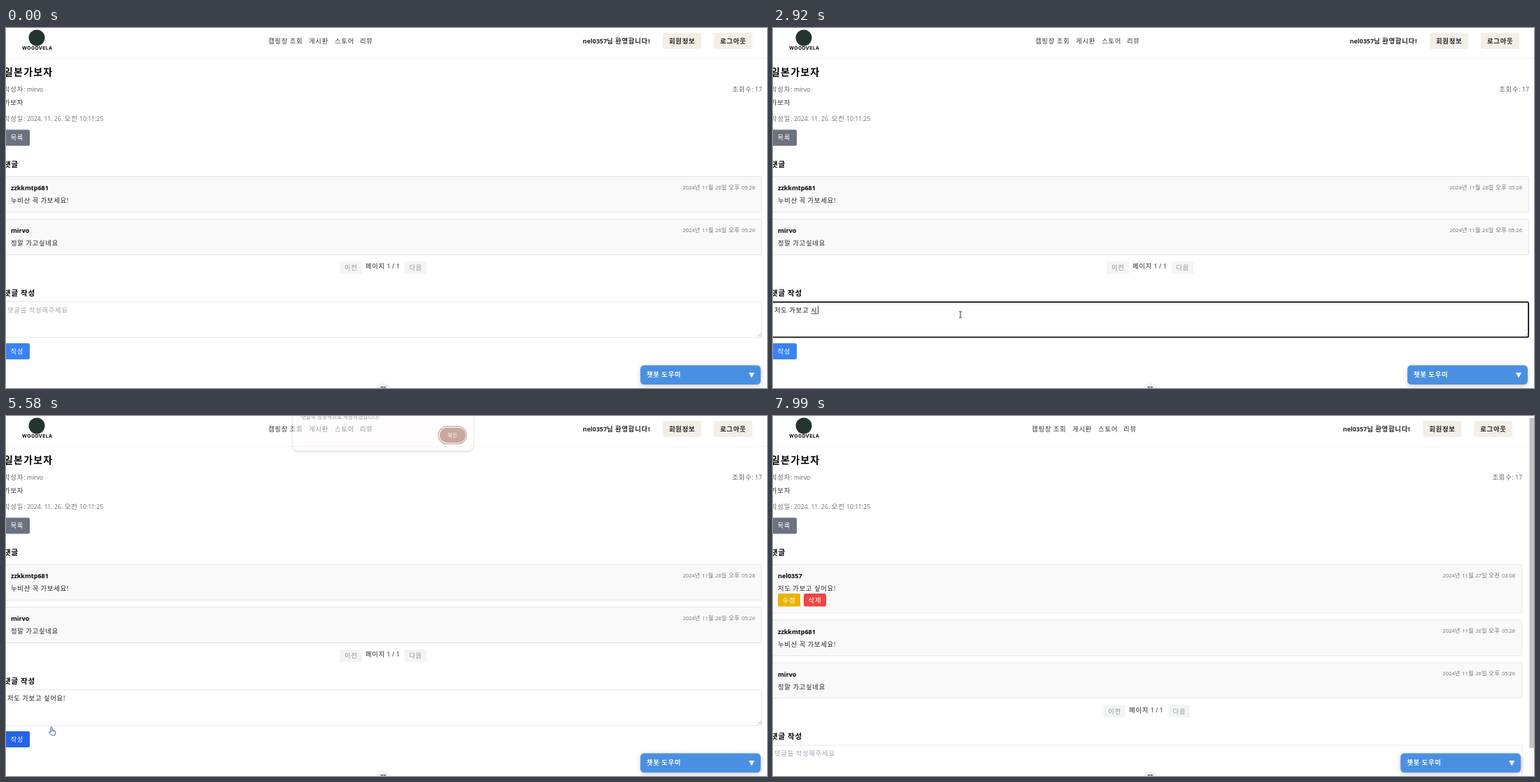
Animation of 1088 by 515 pixels, one loop 8790 ms. Source, as an HTML page:

```html
<!DOCTYPE html>
<html lang="ko">
<head>
<meta charset="utf-8">
<title>캠핑 게시판</title>
<style>
html, body { margin: 0; width: 100%; height: 100%; overflow: hidden; background: #fff; }
svg { display: block; width: 100vw; height: 100vh; }
text { font-family: "Open Sans", "Noto Sans CJK KR", sans-serif; word-spacing: .03em; white-space: pre; }
.brand { font-family: Inter, sans-serif; }
.chat { filter: drop-shadow(0 2px 3px rgba(0, 0, 0, .22)); }
.modal { filter: drop-shadow(0 1px 1.5px rgba(0, 0, 0, .4)); }
</style>
</head>
<body>
<svg id="stage" viewBox="0 0 1088 515"></svg>
<script>
const LOOP = 8790, FOCUS = 860, SUBMIT = 5380, DONE = 6640;
const USER = 'nel0357', MSG = '저도 가보고 싶어요!';
const SIZE = 9.2, SMALL = 8.05, LEFT = -3;
const stage = document.getElementById('stage');
const clamp = v => Math.max(0, Math.min(1, v));
const isHangul = c => /[ㄱ-힣]/.test(c);

// cy is the optical middle of the line; Hangul is set slightly larger and looser than Latin
function text(x, cy, str, { size = SIZE, fill = '#222', bold = false, anchor = 'start' } = {}) {
  const body = str.replace(/[ㄱ-힣]+/g,
    `<tspan font-size="${size * 1.015}" letter-spacing="${size * .086}">$&</tspan>`);
  return `<text x="${x}" y="${cy + size * .37}" font-size="${size * (bold ? .98 : .94)}" fill="${fill}"
    font-weight="${bold ? 700 : 400}" text-anchor="${anchor}">${body}</text>`;
}
const rect = (x, y, x2, y2, fill, r = 0, more = '') =>
  `<rect x="${x}" y="${y}" width="${x2 - x}" height="${y2 - y}" rx="${r}" fill="${fill}" ${more}/>`;
const path = (d, fill, stroke = 'none', more = '') =>
  `<path d="${d}" fill="${fill}" stroke="${stroke}" ${more}/>`;
const button = (x, y, x2, y2, fill, tx, label, opt) =>
  rect(x, y, x2, y2, fill, 2.3) + text(tx, (y + y2) / 2, label, { fill: '#fff', ...opt });

// Typing, syllable by syllable as an input method composes it
const typed = [
  [1660, 'ㅈ'], [1720, '저'], [1860, '젇'], [1920, '저도'],
  ...['저도 ', '저도 ㄱ', '저도 가', '저도 갑', '저도 가보', '저도 가복', '저도 가보고',
    '저도 가보고 ', '저도 가보고 ㅅ', '저도 가보고 시'].map((s, i) => [2120 + i * 88.8, s]),
  [3060, '저도 가보고 싶'], [3260, '저도 가보고 싶ㅇ'], [3320, '저도 가보고 싶어'],
  [3460, '저도 가보고 싶엉'], [3590, '저도 가보고 싶어요'], [3920, MSG]
];

function header(shift) {
  const nav = [[375, '캠핑장 조회'], [433, '게시판'], [470, '스토어'], [506, '리뷰']];
  const right = 2 * shift;
  return rect(0, 43, 1088, 44, '#f0f0f0')
    + '<circle cx="44" cy="14" r="11.5" fill="#26352b"/>'
    + '<text class="brand" x="44.8" y="31.3" font-size="6.7" font-weight="700" letter-spacing=".5" text-anchor="middle">WOODVELA</text>'
    + nav.map(([x, s]) => text(x - shift, 18.5, s, { fill: '#333' })).join('')
    + text(920.5 - right, 18.5, USER + '님 환영합니다!', { bold: true, anchor: 'end' })
    + [[939, '회원정보'], [1012, '로그아웃']].map(([x, s]) =>
      button(x - right, 7, x + 55 - right, 30, '#f3efe6', x + 9 - right, s, { fill: '#222', bold: true })).join('');
}

function card(y, y2, right, name, body, date) {
  return rect(LEFT, y + .5, right - .5, y2 - .5, '#f9f9f9', 2.3, 'stroke="#e5e5e5"')
    + text(7, y + 17, name, { bold: true, fill: '#000' })
    + text(7, y + 35, body)
    + text(right - 10, y + 16, date, { size: SMALL, fill: '#6b7280', anchor: 'end' });
}

function textarea(t, y, right, done) {
  const focus = t >= FOCUS && t < SUBMIT;
  const key = done ? null : typed.findLast(k => t >= k[0]);
  const value = key ? key[1] : '';
  let out = focus
    ? rect(LEFT, y + .9, right - .9, y + 51.2, '#fff', 1.8, 'stroke="#101010" stroke-width="1.8"')
    : rect(LEFT, y + .5, right - .5, y + 51.5, '#fff', 2, 'stroke="#e5e7eb"');
  out += path(`M${right - 6} ${y + 50}l5-5M${right - 3} ${y + 50}l2-2`, 'none', '#888', 'stroke-width=".7"');
  out += value ? text(2, y + 12.5, value, { fill: '#111' })
    : text(2, y + 12.5, '댓글을 작성해주세요', { fill: '#9ca3af' });
  if (focus) {
    const end = [...value].reduce((x, c) => x + (isHangul(c) ? SIZE * 1.02 : 2.5), 2.2);
    if (value && t < 3920 && isHangul(value.at(-1))) out += rect(end - 9, y + 17.2, end, y + 18, '#222');
    const since = t - (key ? key[0] : FOCUS);
    if (Math.floor(since / 530) % 2 === 0) out += rect(Math.round(end), y + 6.5, Math.round(end) + .8, y + 18, '#111');
  }
  return out;
}

function page(t) {
  const done = t >= DONE, shift = done ? 4.9 : 0, dy = done ? 79.3 : 0;
  const right = 1081 - 2 * shift, grey = { fill: '#6b7280' };
  const mid = x => x - shift;
  const pager = (x, x2, tx, s) =>
    button(mid(x), 334 + dy, mid(x2), 352 + dy, '#f3f4f6', mid(tx), s, { fill: '#8f949c' });
  let out = header(shift)
    + text(LEFT, 63, '일본가보자', { size: 13.8, bold: true, fill: '#000' })
    + text(LEFT, 88, '작성자: mirvo', { fill: '#5b616b' })
    + text(right, 88, '조회수: 17', { fill: '#5b616b', anchor: 'end' })
    + text(LEFT, 106.5, '가보자', { fill: '#333' })
    + text(LEFT, 129.5, '작성일: 2024. 11. 26. 오전 10:11:25', grey)
    + button(LEFT, 145.5, 34, 168.5, '#6b7280', 6.4, '목록')
    + text(LEFT, 195, '댓글', { size: 10.35, bold: true, fill: '#000' });
  if (done) out += card(212, 282.5, right, USER, MSG, '2024년 11월 27일 오전 03:08')
    + button(7, 254, 39, 272.5, '#eab308', 13.8, '수정')
    + button(44, 254, 76, 272.5, '#ef4444', 50.6, '삭제');
  out += card(212 + dy, 264 + dy, right, 'zzkkmtp681', '누비산 꼭 가보세요!', '2024년 11월 26일 오후 05:28')
    + card(273 + dy, 325 + dy, right, 'mirvo', '정말 가고싶네요', '2024년 11월 26일 오후 05:26')
    + pager(477, 509, 484, '이전')
    + text(mid(514), 341 + dy, '페이지 1 / 1')
    + pager(569.5, 601, 576.5, '다음')
    + text(LEFT, 379 + dy, '댓글 작성', { size: 10.35, bold: true, fill: '#000' })
    + textarea(t, 391.2 + dy, right, done)
    + button(LEFT, 451 + dy, 34, 474 + dy, t > 4790 ? '#2563eb' : '#3b82f6', 6.4, '작성')
    + '<circle cx="539.5" cy="519" r="11" fill="#f4f4f4"/>'
    + path('M535 513.6h8.5M537 515l1-1.5M541.500 515l-1-1.500', 'none', '#444', 'stroke-width=".9"')
    + `<g transform="translate(${-2 * shift})">`
    + rect(907, 482.5, 1079, 510, '#4a90e2', 5.5, 'class="chat"')
    + text(916, 496, '챗봇 도우미', { fill: '#fff', bold: true })
    + path('M1062 493h8l-4 7.500z', '#fff') + '</g>';
  if (done) out += rect(1081, 0, 1088, 515, '#fafafa') + rect(1081.5, 3, 1088, 475, '#c1c1c1');
  return out;
}

function modal(t) {
  const shown = t < 6590 ? clamp((t - 5450) / 270) : 1 - clamp((t - 6590) / 142);
  if (!shown) return '';
  return `<g opacity="${shown}" transform="translate(0 ${-10.4 * (1 - shown)})">`
    + rect(410, -60, 668, 55, '#fffbfe', 7, 'class="modal"')
    + text(422, 6.5, '댓글이 성공적으로 작성되었습니다!', { size: 6.95, fill: '#222' })
    + (t < 6590 ? rect(618.2, 20.2, 658.3, 45.300, 'none', 12.5, 'stroke="#8f4c38" stroke-width="1.2"') : '')
    + rect(620, 22, 657, 43.5, '#8f4c38', 10.7)
    + text(638.5, 33, '확인', { size: 6.95, fill: '#fff', anchor: 'middle' }) + '</g>';
}

// Pointer route: time, x, y
const route = [
  [190, 330, 508], [790, 268, 410], [4400, 268, 410], [4450, 190, 425], [4520, 88, 434],
  [4720, 60, 462], [4850, 25, 474], [5180, 20, 466], [5400, 20, 466], [5580, 64, 445],
  [6180, 629.500, 35.5], [6590, 629.5, 35.5], [6720, 554, 84], [6910, 554, 84],
  [7200, 440, 230], [7850, 1072, 499], [7990, 1076, 506]
];
const shapes = {
  arrow: path('M0 0V10L2.400 7.900 4 11.500 5.500 10.800 4 7.400H7Z', '#fff', '#222', 'stroke-width=".8"'),
  ibeam: path('M-2-4.300H-.5L0-3.800 .5-4.300H2M0-3.800V3.800M-2 4.300H-.5L0 3.800 .5 4.300H2', 'none', '#222', 'stroke-width=".9"'),
  hand: path('M-1 8V1Q0-.8 1 1V5L5 6.200Q6.200 6.600 6 8L5 12.500H0.500L-3.500 8.500Q-3.500 6.500-1 8M1 5V7M3 5.600V7.500', '#fff', '#27408b', 'stroke-width=".8" stroke-linejoin="round"')
};

function pointer(t) {
  const i = route.findIndex(k => t < k[0]);
  if (i < 1) return '';
  const [a, b] = [route[i - 1], route[i]], f = (t - a[0]) / (b[0] - a[0]);
  const x = a[1] + (b[1] - a[1]) * f, y = a[2] + (b[2] - a[2]) * f;
  const kind = t < 4600 && y > 392 && y < 443 ? 'ibeam' : t > 4780 && t < 5650 ? 'hand' : 'arrow';
  const click = t >= 6450 && t < 6580 ? `<circle cx="${x}" cy="${y}" r="7.500" fill="#c8aa00" opacity=".8"/>` : '';
  return click + `<g transform="translate(${x} ${y})">${shapes[kind]}</g>`;
}

let last = '';
function draw(now) {
  const t = now % LOOP;
  const markup = page(t) + modal(t) + pointer(t);
  if (markup !== last) stage.innerHTML = last = markup;
  requestAnimationFrame(draw);
}
draw(0);
</script>
</body>
</html>
```
